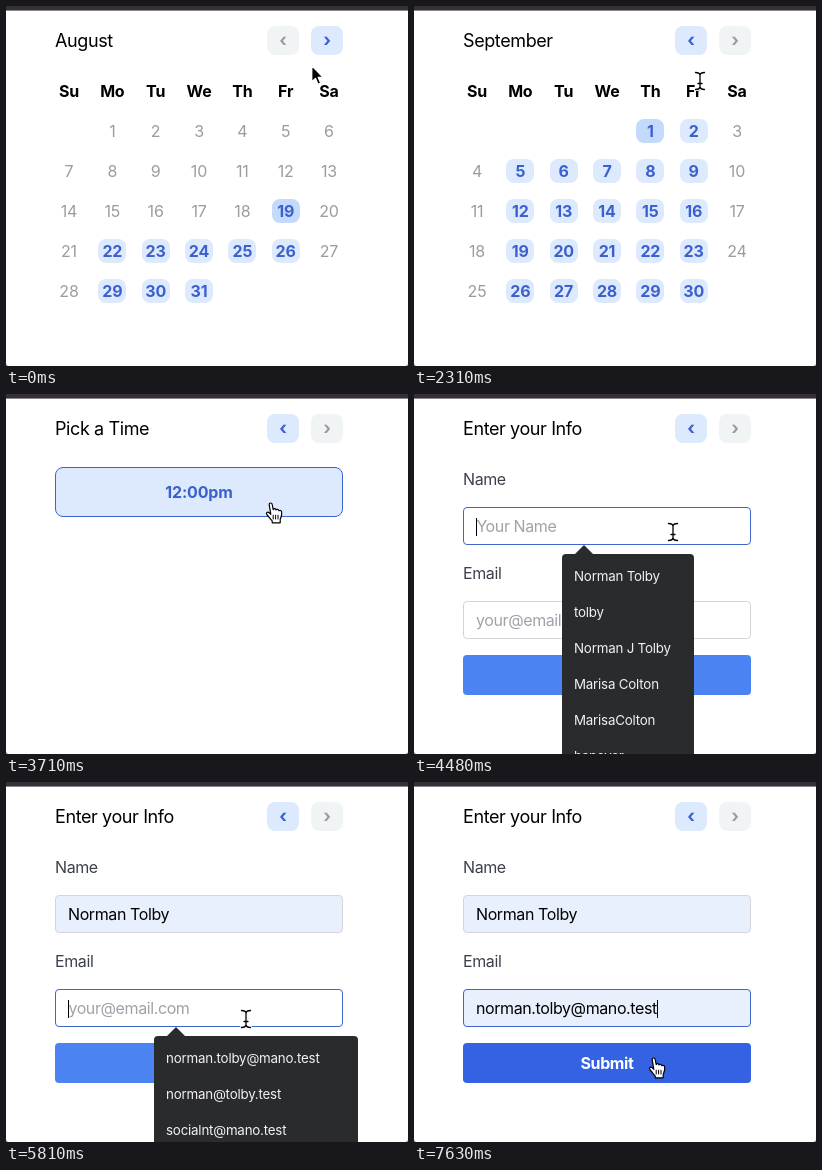
Animation, 402 px wide and 360 px high, one loop 8 s. Source, as an HTML page:

```html
<!DOCTYPE html>
<html lang="en">
<head>
<meta charset="utf-8">
<title>Booking flow</title>
<style>
  html, body { margin: 0; width: 100%; height: 100%; overflow: hidden; background: #77747a; }
  #stage { position: absolute; left: 0; top: 0; width: 402px; height: 360px; overflow: hidden; background: #fff;
    border-radius: 0 0 3px 3px; font: 16px/20px Inter, sans-serif; letter-spacing: -.025em; color: #000; }
  #stage div, #stage svg { position: absolute; white-space: pre; box-sizing: border-box; }
  [hidden] { display: none !important; }
  #bar { width: 402px; height: 5px; background: linear-gradient(#352f38 4px, #8b878d 4px); }
  .title { left: 49px; top: 25px; font-size: 18px; }
  .nav { top: 20px; width: 32px; height: 29px; border-radius: 8px; text-align: center;
    font: 700 18px/28px Inter, sans-serif; background: #f1f4f5; color: #999ca3; }
  .nav.on { background: #dde9fd; color: #3460d8; }
  .nav.hover { background: #c4dafc; }
  .day { width: 28px; height: 24px; line-height: 24px; border-radius: 8px; text-align: center; color: #999ca0; letter-spacing: -.01em; }
  .head { color: #000; font-weight: 700; }
  .open { background: #dde9fd; color: #3a60d0; font-weight: 700; }
  .picked, .day.hover { background: #c4dafc; }
  .slot { left: 49px; top: 73px; width: 288px; height: 50px; border: 1px solid #3a64d6; border-radius: 8px;
    background: #dde9fd; color: #3a60d0; font-weight: 700; line-height: 48px; text-align: center; letter-spacing: -.01em; }
  .label { left: 49px; color: #3b404b; }
  .field { left: 49px; width: 288px; height: 38px; border: 1px solid #d3d5da; border-radius: 4px; padding-left: 12px; line-height: 36px; }
  .field.focus { border-color: #3f66cc; }
  .field.auto { background: #e8f0fd; }
  .field.empty { color: #9fa2a9; }
  .field.preview, .menu { font-size: 13.33px; letter-spacing: -.015em; }
  .caret { display: inline-block; width: 1px; height: 18px; margin-left: .4px; background: #000; vertical-align: -4px; margin-right: -1px; }
  .submit { left: 49px; top: 261px; width: 288px; height: 40px; border-radius: 4px; background: #4b84f2;
    color: #fff; font-weight: 700; line-height: 40px; text-align: center; }
  .submit.hover { background: #3562e3; }
  .menu { left: 148px; height: 230px; padding-top: 4px; border-radius: 4px; background: #2a2b2d; color: #f2f2f2; }
  .menu::before { content: ""; position: absolute; left: 13px; top: -9px; border: 9px solid transparent; border-top: 0; border-bottom-color: #2a2b2d; }
  #stage .menu div { position: static; height: 36px; line-height: 36px; padding-left: 12px; }
  .menu .hover { background: #414244; }
  #cursor { overflow: visible; width: 1px; height: 1px; }
</style>
</head>
<body>
<div id="stage">
  <div id="bar"></div>
  <div class="title"></div>
  <div class="nav" id="prev" style="left:261px">‹</div>
  <div class="nav" id="next" style="left:305px">›</div>
  <div id="august"></div>
  <div id="september"></div>
  <div id="time"><div class="slot">12:00pm</div></div>
  <div id="info">
    <div class="label" style="top:75px">Name</div>
    <div id="name" style="top:113px"></div>
    <div class="label" style="top:169px">Email</div>
    <div id="email" style="top:207px"></div>
    <div class="submit">Submit</div>
    <div class="menu" id="names" style="top:160px;width:132px"></div>
    <div class="menu" id="emails" style="top:254px;width:204px"></div>
  </div>
  <svg id="cursor">
    <g id="arrow" stroke-linejoin="round">
      <path d="M.7 .5V17L4.5 13.4 7 19.4 9.8 18.2 7.3 12.4H12.4Z" stroke="#fff" stroke-width="1.4"/>
    </g>
    <g id="hand" stroke-linejoin="round" stroke-linecap="round" stroke="#000" stroke-width="1.2">
      <path fill="#fff" d="M-1.8 1.6C-2-.4 .9-.6 1.2 1.4L2.2 6.6C2.6 5.3 4.8 5.4 5 7 5.6 5.8 7.7 6.1 7.9 7.7 8.8 6.9 10.6 7.4 10.7 9.2 11 13 9.9 14.8 9.2 16.4V19.8H1.2V17.9C-.7 16.4-2.2 13.6-4.2 11.5-5.3 10 -3.6 8.2-1.9 9.7L-.2 11.4Z"/>
      <path fill="none" stroke-width="1" d="M2.2 12.2V16M4.6 12.2V16M7 12.2V16"/>
    </g>
    <g id="beam" fill="none" stroke-linecap="round">
      <path id="beamShape" d="M-4.5-8.5Q-.5-8.5 0-6 .5-8.5 4.5-8.5M0-6V6M-4.5 8.5Q-.5 8.5 0 6 .5 8.5 4.5 8.5M-2 2.5H2" stroke="#fff" stroke-width="3"/>
      <use href="#beamShape"/>
      <path d="M-4.5-8.5Q-.5-8.5 0-6 .5-8.5 4.5-8.5M0-6V6M-4.5 8.5Q-.5 8.5 0 6 .5 8.5 4.5 8.5M-2 2.5H2" stroke="#000" stroke-width="1.3"/>
    </g>
  </svg>
</div>
<script>
const LOOP = 8000, STEP = 70;
const $ = id => document.getElementById(id);
const title = document.querySelector('.title');
const submit = document.querySelector('.submit');
const person = 'Norman Tolby', address = 'norman.tolby@mano.test';

// [ms, x, y, shape]: straight moves between entries
const path = [
  [0, 305, 59, 'arrow'], [70, 270, 150, 'arrow'], [140, 239, 229, 'arrow'], [210, 280, 120, 'arrow'],
  [280, 321, 39, 'arrow'], [630, 321, 39, 'arrow'], [700, 321, 41, 'hand'], [770, 321, 41, 'hand'],
  [840, 316, 62, 'arrow'], [1120, 275, 221, 'arrow'], [1330, 275, 221, 'arrow'], [1400, 311, 147, 'arrow'],
  [1470, 325, 75, 'arrow'], [1540, 328, 35, 'hand'], [1610, 328, 35, 'hand'], [1750, 327, 33, 'hand'],
  [1890, 328, 32, 'arrow'], [2100, 328, 32, 'arrow'], [2240, 300, 62, 'arrow'], [2310, 286, 75, 'beam'],
  [2380, 282, 90, 'arrow'], [2450, 277, 104, 'arrow'], [2520, 275, 110, 'hand'], [2590, 275, 110, 'hand'],
  [2800, 278, 118, 'hand'], [3360, 278, 118, 'hand'], [3710, 265, 109, 'hand'], [3850, 265, 108, 'arrow'],
  [3920, 265, 108, 'arrow'], [3990, 261, 126, 'beam'], [4060, 257, 146, 'beam'], [4130, 255, 152, 'arrow'],
  [4200, 259, 138, 'beam'], [4550, 259, 138, 'beam'], [4620, 255, 158, 'arrow'], [4690, 250, 172, 'arrow'],
  [4760, 250, 172, 'arrow'], [5040, 248, 174, 'arrow'], [5250, 248, 175, 'arrow'], [5460, 245, 198, 'arrow'],
  [5530, 243, 214, 'beam'], [5670, 240, 237, 'beam'], [5810, 240, 237, 'beam'], [5880, 240, 245, 'beam'],
  [5950, 240, 253, 'arrow'], [6020, 240, 258, 'arrow'], [6230, 240, 258, 'arrow'], [6300, 241, 260, 'arrow'],
  [6580, 241, 260, 'hand'], [7070, 241, 260, 'hand'], [7280, 240, 276, 'hand']
];

function buildMonth(id, offset, days, first, picked) {
  const cell = (text, col, row, cls) =>
    `<div class="day ${cls}" style="left:${49 + col * 260 / 6}px;top:${73 + row * 40}px">${text}</div>`;
  let html = ['Su', 'Mo', 'Tu', 'We', 'Th', 'Fr', 'Sa'].map((d, i) => cell(d, i, 0, 'head')).join('');
  for (let d = 1; d <= days; d++) {
    const slot = d + offset - 1, col = slot % 7;
    const open = d === picked || (d >= first && col % 6 > 0);
    html += cell(d, col, 1 + Math.floor(slot / 7), (open ? 'open' : '') + (d === picked ? ' picked' : ''));
  }
  $(id).innerHTML = html;
}
buildMonth('august', 1, 31, 22, 19);
buildMonth('september', 4, 30, 1, 1);
const secondDay = $('september').querySelectorAll('.day')[8];

const fillMenu = (id, items) => $(id).innerHTML = items.map(s => `<div>${s}</div>`).join('');
fillMenu('names', [person, 'tolby', 'Norman J Tolby', 'Marisa Colton', 'MarisaColton', 'hanover']);
fillMenu('emails', [address, 'norman@tolby.test', 'socialnt@mano.test']);

function setField(id, hint, value, state, caret) {
  const el = $(id), mark = caret ? '<span class="caret"></span>' : '';
  const html = value ? value + mark : mark + hint;
  el.className = `field ${value ? 'auto' : 'empty'} ${state}`;
  if (el.dataset.html !== html) el.innerHTML = el.dataset.html = html;
}

function drawCursor(t) {
  let i = path.length - 1;
  while (path[i][0] > t) i--;
  const [t0, x0, y0, shape] = path[i], [t1, x1, y1] = path[i + 1] || [LOOP, x0, y0];
  const k = (t - t0) / (t1 - t0);
  $('cursor').style.transform = `translate(${x0 + (x1 - x0) * k}px, ${y0 + (y1 - y0) * k}px)`;
  for (const s of ['arrow', 'hand', 'beam']) $(s).style.display = s === shape ? '' : 'none';
}

function render(now) {
  const t = Math.floor(now % LOOP / STEP) * STEP;
  const within = (a, b) => t >= a && t < b;
  const blink = start => t >= start && Math.floor((t - start) / 525) % 2 === 0;
  const page = t < 1890 ? 'august' : t < 2940 ? 'september' : t < 3850 ? 'time' : 'info';
  for (const id of ['august', 'september', 'time', 'info']) $(id).hidden = id !== page;
  title.textContent = { august: 'August', september: 'September', time: 'Pick a Time', info: 'Enter your Info' }[page];

  $('prev').classList.toggle('on', t >= 1890);
  $('next').classList.toggle('on', t < 1890);
  $('next').classList.toggle('hover', within(700, 840) || within(1540, 1890));
  secondDay.classList.toggle('hover', t >= 2660);

  const nameFocus = within(4410, 5740), emailFocus = t >= 5740;
  const namePreview = within(4830, 5250), emailPreview = within(6090, 6580);
  setField('name', 'Your Name', t >= 4830 ? person : '',
    (nameFocus ? 'focus ' : '') + (namePreview ? 'preview' : ''),
    nameFocus && !namePreview && blink(t < 5250 ? 4410 : 5250));
  setField('email', 'your@email.com', t >= 6090 ? address : '',
    (emailFocus ? 'focus ' : '') + (emailPreview ? 'preview' : ''),
    emailFocus && !emailPreview && blink(t < 6580 ? 5740 : 6580));
  submit.classList.toggle('hover', t >= 6580);
  $('names').hidden = !within(4480, 5250);
  $('emails').hidden = !within(5740, 6580);
  $('names').firstChild.classList.toggle('hover', t >= 4690);
  $('emails').firstChild.classList.toggle('hover', t >= 6020);
  drawCursor(t);
}

const start = performance.now();
function frame() {
  render(performance.now() - start);
  requestAnimationFrame(frame);
}
frame();
</script>
</body>
</html>
```
